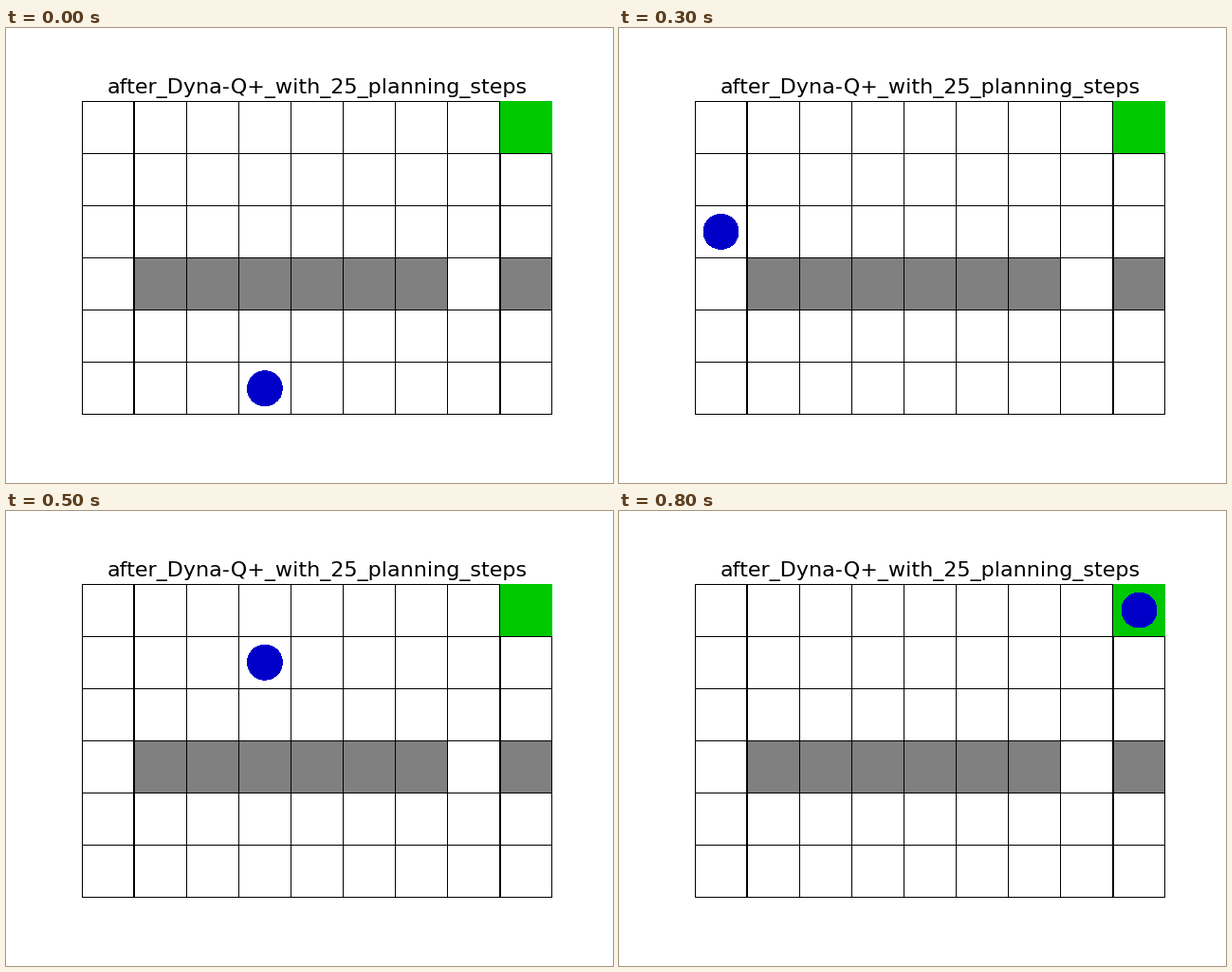
A matplotlib script for the animation above (0.85 s loop, 640 by 480 pixels).

```python
import matplotlib.pyplot as plt
import numpy as np
from matplotlib.animation import FuncAnimation
from matplotlib.colors import ListedColormap
from matplotlib.patches import Circle, Rectangle

COLS, ROWS = 9, 6
START = (3, 5)
GOAL = (8, 0)
STEP_MS = 50
MOVES = {"L": (-1, 0), "R": (1, 0), "U": (0, -1)}
ROUTE = "LLLUUURRRURURRRR"

plt.rcParams["font.family"] = "DejaVu Sans"

# Cells visited by the agent, one per frame
path = [START]
for move in ROUTE:
    dx, dy = MOVES[move]
    x, y = path[-1]
    path.append((x + dx, y + dy))

# Wall row, open at the left end and near the right end
walls = np.zeros((ROWS, COLS))
walls[3, 1:7] = 1
walls[3, 8] = 1

fig, ax = plt.subplots(figsize=(6.4, 4.8), dpi=100)
fig.subplots_adjust(left=0.125, right=0.9, bottom=0.11, top=0.88)
# Thin aliased edges give crisp two-pixel grid lines
ax.pcolor(walls, cmap=ListedColormap(["white", "#808080"]),
          edgecolors="black", linewidths=0.25, antialiased=False)
ax.set_xlim(0, COLS)
ax.set_ylim(ROWS, 0)
ax.set_aspect("equal")
ax.axis("off")
ax.set_title("after_Dyna-Q+_with_25_planning_steps", fontsize=16)

ax.add_patch(Rectangle(GOAL, 1, 1, facecolor="#00c800", linewidth=0))
agent = ax.add_patch(Circle((0, 0), 1 / 3, facecolor="#0000c8", linewidth=0,
                            antialiased=False, zorder=3))


def draw(frame):
    x, y = path[frame]
    agent.center = (x + 0.5, y + 0.5)
    return (agent,)


anim = FuncAnimation(fig, draw, frames=len(path), interval=STEP_MS,
                     repeat=True, repeat_delay=0)
plt.show()
```
